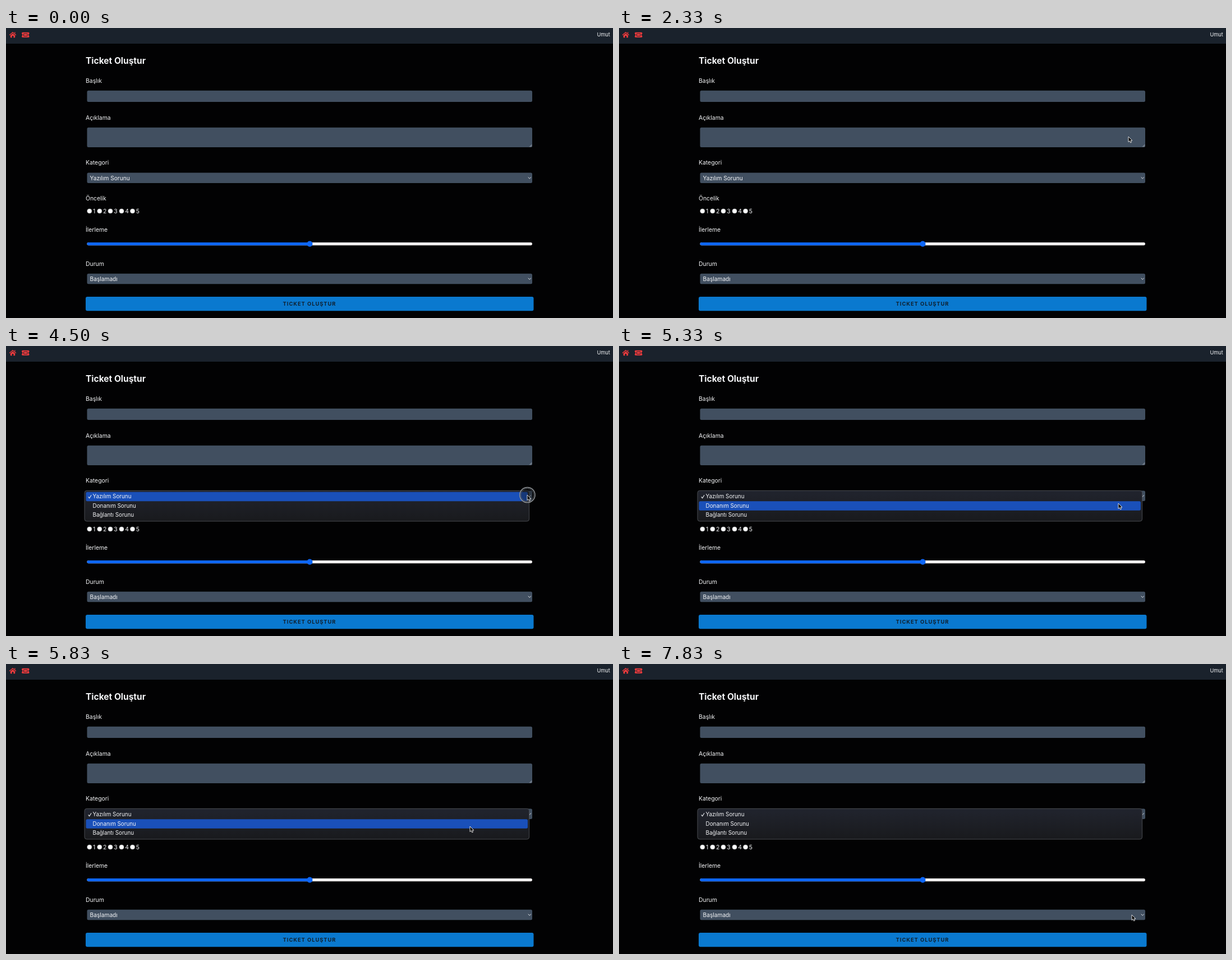
An HTML page for the animation above (8 s loop, 1082 by 518 pixels).

```html
<!DOCTYPE html>
<html lang="tr">
<head>
<meta charset="utf-8">
<title>Ticket Oluştur</title>
<style>
  html, body { margin: 0; width: 100%; height: 100%; overflow: hidden; background: #020203; }
  svg { display: block; width: 1082px; height: 518px; }
  text { font-family: Inter, sans-serif; fill: #f3f4f6; white-space: pre; }
  .label { font-size: 10.4px; }
  .value { font-size: 10.2px; }
  .item { font-size: 9.85px; }
  .field { fill: #414f60; }
  .line { fill: none; stroke: #e3e6ea; stroke-linecap: round; stroke-linejoin: round; }
  .red { fill: #ef3b3d; }
</style>
</head>
<body>
<svg viewBox="0 0 1082 518">
  <defs>
    <linearGradient id="panel" x1="0" y1="0" x2="0" y2="1">
      <stop offset="0" stop-color="#21242e"/>
      <stop offset="1" stop-color="#191a1d"/>
    </linearGradient>
  </defs>
  <rect width="1082" height="518" fill="#020203"/>
  <rect width="1082" height="28" fill="#1a222c"/>

  <!-- home and ticket icons -->
  <g class="red">
    <path d="M12 9.7 L16.2 13.3 V16.4 Q16.2 17.2 15.4 17.2 H13.4 V14 H10.6 V17.2 H8.6 Q7.8 17.2 7.8 16.4 V13.3 Z"/>
    <path d="M15 7.6 H16.5 V10 L15 8.8 Z"/>
  </g>
  <path d="M6.6 12.3 L12 7.7 L17.4 12.3" fill="none" stroke="#ef3b3d" stroke-width="1.4" stroke-linecap="round" stroke-linejoin="round"/>
  <path class="red" d="M29.6 7.8 H40 Q41.4 7.8 41.4 9.2 V10.9 A1.4 1.4 0 0 0 41.4 13.7 V15.4 Q41.4 16.8 40 16.8 H29.6 Q28.2 16.8 28.2 15.4 V13.7 A1.4 1.4 0 0 0 28.2 10.9 V9.2 Q28.2 7.8 29.6 7.8 Z"/>
  <rect x="31.5" y="10.1" width="6.6" height="4.4" rx=".4" fill="none" stroke="#1a222c" stroke-width=".9"/>
  <text x="1053.4" y="15.2" font-size="9.2">Umut</text>

  <text x="142" y="64.2" font-size="15.5" font-weight="700">Ticket Oluştur</text>
  <g id="labels"></g>

  <rect class="field" x="144.5" y="111.7" width="793.5" height="20.3" rx="2.5"/>
  <rect class="field" x="144.5" y="177.7" width="793.5" height="35.3" rx="2.5"/>
  <path class="line" d="M933.6 212 L937 208.6 M935.7 212 L937 210.7" stroke-width=".6"/>
  <g id="selects"></g>
  <g id="radios"></g>

  <rect x="144.5" y="383" width="793.5" height="5.2" rx="2.6" fill="#f1efef"/>
  <rect x="144.5" y="383" width="397" height="5.2" rx="2.6" fill="#0d66f6"/>
  <circle cx="541.4" cy="385.6" r="5.1" fill="#0d66f6"/>

  <rect x="142" y="480" width="798.5" height="25.3" rx="3" fill="#0a79cf"/>
  <text x="493.6" y="496" font-size="9.3" font-weight="700" letter-spacing="1" style="fill:#10202f">TICKET OLUŞTUR</text>

  <g id="menu">
    <rect x="140" y="258.3" width="792.6" height="54.7" rx="4" fill="url(#panel)" stroke="#484b50" stroke-width="1"/>
    <rect id="hover" x="142.5" width="787.5" height="16.5" rx="2.5" fill="#1a50b9"/>
    <path class="line" d="M147 269.6 L148.7 271.8 L151.8 266.7" stroke-width="1.2"/>
    <g id="items"></g>
  </g>

  <g id="ring">
    <circle cx="929.4" cy="266" r="13.6" fill="rgba(18,20,24,.4)" stroke="#8e9296" stroke-width="1.5"/>
    <circle cx="929.4" cy="266" r="11.6" fill="none" stroke="#5b6066" stroke-width=".8"/>
  </g>
  <path id="cursor" d="M0 0 V9.6 L2.2 7.6 L3.8 11 L5.5 10.2 L4 7 H7 Z" fill="#050505" stroke="#f2f2f2" stroke-width=".9" stroke-linejoin="round"/>
</svg>
<script>
const $ = id => document.getElementById(id);
const text = (cls, x, y, s) => `<text class="${cls}" x="${x}" y="${y}">${s}</text>`;

$('labels').innerHTML = [
  ['Başlık', 97.6], ['Açıklama', 163.5], ['Kategori', 244.2],
  ['Öncelik', 308.3], ['İlerleme', 364], ['Durum', 424.7]
].map(([s, y]) => text('label', 142, y, s)).join('');

$('selects').innerHTML = [['Yazılım Sorunu', 258.6], ['Başlamadı', 438.8]].map(([s, y]) =>
  `<rect class="field" x="144.5" y="${y}" width="793.5" height="18.5" rx="2.5"/>` +
  text('value', 149.5, y + 12.9, s) +
  `<path class="line" d="M931 ${y + 8.2} l2.3 2.2 l2.3 -2.2" stroke-width="1"/>`).join('');

$('radios').innerHTML = [148.8, 166.8, 186, 206, 225.5].map((x, i) =>
  `<circle cx="${x}" cy="327" r="4.1" fill="#fff" stroke="#85888c" stroke-width=".5"/>` +
  text('label', x + 6.3, 331, i + 1)).join('');

const ROW = 16.5, TOP = 260.8;
$('items').innerHTML = ['Yazılım Sorunu', 'Donanım Sorunu', 'Bağlantı Sorunu']
  .map((s, i) => text('item', 154.6, 272.2 + i * ROW, s)).join('');

// Pointer stops: step, x, y
const LOOP = 8000, FPS = 6, ENTER = 8, OPEN = 26, RING_END = 28;
const path = [
  [ENTER, 1084, 120], [14, 908, 194], [25, 929, 266], [28, 929, 266],
  [32, 890, 281], [35, 827, 290], [39, 834, 322], [47, 914, 448]
];

function slope(i, k) {
  const a = path[i - 1], b = path[i + 1];
  if (!a || !b || i === 2 || i === 3) return 0;
  return (b[k] - a[k]) / (b[0] - a[0]);
}

function pointer(step) {
  let i = 0;
  while (i < path.length - 2 && step >= path[i + 1][0]) i++;
  const a = path[i], b = path[i + 1], d = b[0] - a[0];
  const u = Math.min(1, Math.max(0, (step - a[0]) / d)), v = 1 - u;
  return [1, 2].map(k =>
    v * v * (1 + 2 * u) * a[k] + u * v * v * d * slope(i, k) +
    u * u * (3 - 2 * u) * b[k] - u * u * v * d * slope(i + 1, k));
}

const show = (id, on) => $(id).setAttribute('visibility', on ? 'visible' : 'hidden');

function draw(ms) {
  const step = Math.floor(((ms % LOOP) + 4) * FPS / 1000) % (LOOP * FPS / 1000);
  const [x, y] = pointer(step);
  const open = step >= OPEN;
  const row = Math.floor((y - TOP) / ROW);
  $('cursor').setAttribute('transform', `translate(${x.toFixed(2)} ${y.toFixed(2)})`);
  $('hover').setAttribute('y', TOP + row * ROW);
  show('cursor', step >= ENTER);
  show('menu', open);
  show('hover', open && row >= 0 && row < 3);
  show('ring', open && step <= RING_END);
}

const start = performance.now();
function tick() {
  draw(performance.now() - start);
  requestAnimationFrame(tick);
}
draw(0);
requestAnimationFrame(tick);
</script>
</body>
</html>
```
